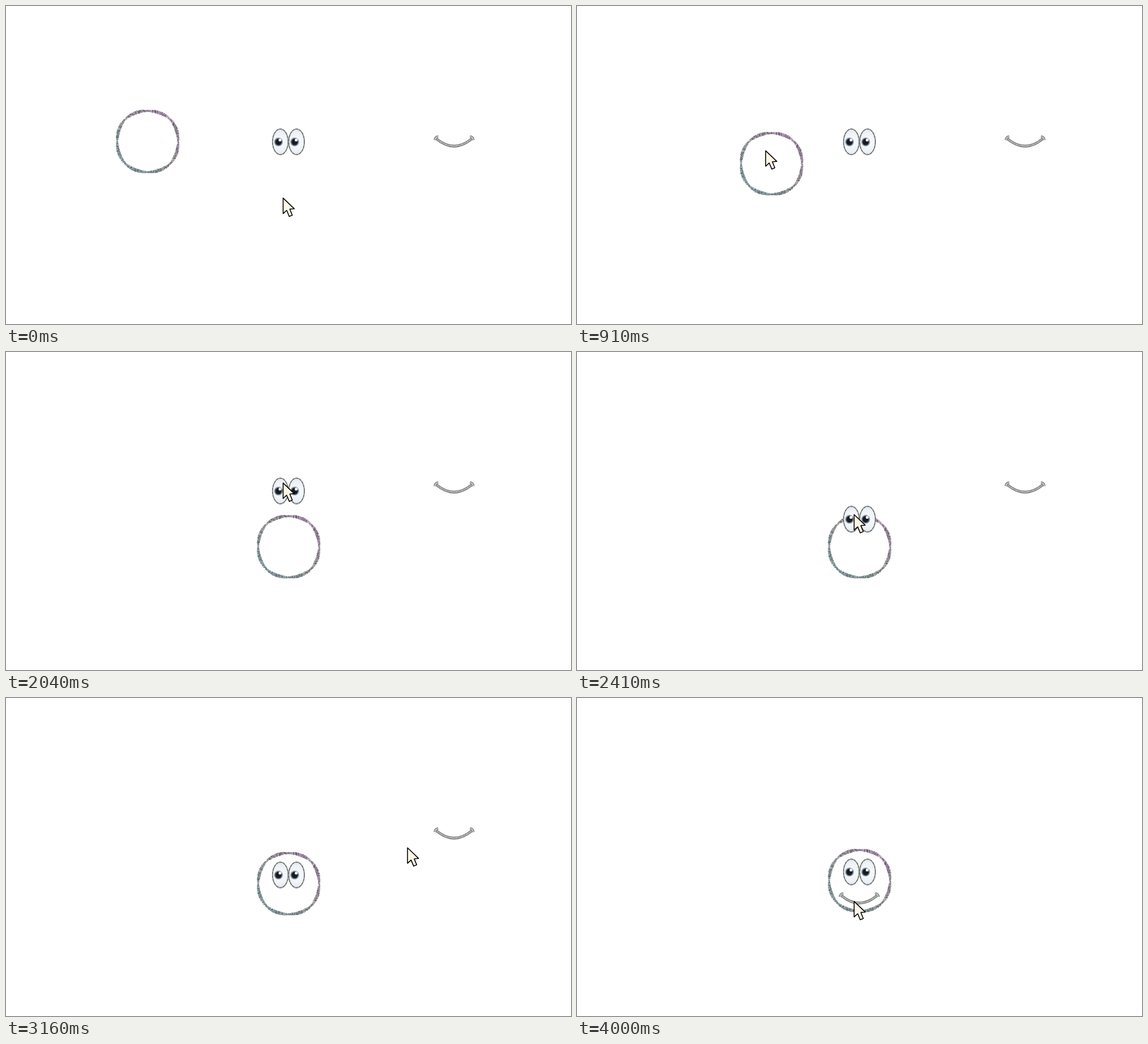
An HTML page with a canvas that plays this animation: 998 px wide and 561 px high, repeating every 4.39 s.

```html
<!DOCTYPE html>
<html>
<head>
<meta charset="utf-8">
<style>
  html, body { margin: 0; width: 100%; height: 100%; overflow: hidden; background: #fff; }
  canvas { display: block; }
</style>
</head>
<body>
<canvas id="stage" width="998" height="561"></canvas>
<script>
const ctx = document.getElementById('stage').getContext('2d');
const LOOP = 4390, LEG = 16, LAST = 96;

// Cursor stops, one leg apart
const stops = [[489, 338], [239, 207.3], [489, 333], [489, 224], [489, 323], [782, 243.5], [489, 358]];

// Progress of a leg, 0 to 1
const leg = (n, i) => Math.min(1, Math.max(0, n / LEG - i));

function at(x, y, draw) {
  ctx.save();
  ctx.translate(x, y);
  draw();
  ctx.restore();
}

function stroke(path, color, width, dash = []) {
  ctx.strokeStyle = color;
  ctx.lineWidth = width;
  ctx.setLineDash(dash);
  ctx.stroke(path);
}

function oval(x, y, rx, ry, fill) {
  const path = new Path2D();
  path.ellipse(x, y, rx, ry, 0, 0, 7);
  ctx.fillStyle = fill;
  ctx.fill(path);
  return path;
}

// Rough, slightly square ring of short hatches, thicker between its eight joints
function ring() {
  let seed = 7;
  const rnd = () => (seed = seed * 16807 % 2147483647) / 2147483647;
  ctx.lineWidth = 0.9;
  for (let i = 0; i < 900; i++) {
    const a = i / 900 * Math.PI * 2;
    const half = 1.2 + 1.5 * Math.abs(Math.sin(4 * a));
    const r = 53.9 + 0.8 * (1 - Math.cos(4 * a)) + (rnd() - 0.5) * 1.2;
    const tint = Math.cos(a + Math.PI / 4);
    const slant = (rnd() - 0.5) * 0.05;
    ctx.strokeStyle = `hsl(${tint > 0 ? 290 : 190}, ${Math.abs(tint) * 13}%, ${26 + rnd() * 54}%)`;
    ctx.beginPath();
    ctx.moveTo((r - half) * Math.cos(a - slant), (r - half) * Math.sin(a - slant));
    ctx.lineTo((r + half) * Math.cos(a + slant), (r + half) * Math.sin(a + slant));
    ctx.stroke();
  }
}

function eye(x) {
  const white = ctx.createRadialGradient(x, 0, 4, x, 0, 24);
  white.addColorStop(0, '#f7f9fc');
  white.addColorStop(0.6, '#eef2f7');
  white.addColorStop(1, '#dde3ea');
  const edge = oval(x, 0, 13.8, 22.6, white);
  stroke(edge, '#a3a8a6', 2);
  stroke(edge, '#6c716e', 1.5, [5, 1.5]);
  oval(x - 3.3, 0.2, 8, 8, '#b4bec9');
  oval(x - 3.3, 0.2, 6.9, 6.9, '#626d78');
  oval(x - 3.3, 0.2, 5.3, 5.5, '#171b21');
  oval(x - 0.7, -3.2, 2.5, 2.5, '#fff');
}

const smile = new Path2D('M-31 -4Q0 21.5 31 -4');
const caps = new Path2D('M-33.8 -2Q-33.5 -7.5 -28 -8M33.8 -2Q33.5 -7.5 28 -8');
function mouth() {
  for (const path of [smile, caps]) stroke(path, '#717471', 4.6);
  for (const path of [smile, caps]) stroke(path, '#c9cbc9', 2.2);
  stroke(smile, '#969996', 1, [8, 2]);
}

const arrow = new Path2D('M.5 .9V28.3L6.8 22.5L11.3 33.2L16.7 31L12.3 20.3L20.2 19.7Z');
function cursor() {
  ctx.lineJoin = 'round';
  ctx.fillStyle = '#fdf5e6';
  ctx.fill(arrow);
  stroke(arrow, '#000', 1.6);
}

function draw(n) {
  ctx.clearRect(0, 0, 998, 561);
  const carry = leg(n, 1), lift = 21.3 * leg(n, 4), smileIn = leg(n, 5);
  at(250.3 + 249 * carry, 239 + 104.5 * carry - lift, ring);
  at(499, 239.6 + 88.5 * leg(n, 3) - lift, () => { eye(-14.4); eye(14.2); });
  at(791.5 - 293 * smileIn, 238.5 + 114.5 * smileIn, mouth);
  const i = Math.min(5, Math.floor(n / LEG)), p = leg(n, i);
  const [x, y] = stops[i].map((v, k) => v + (stops[i + 1][k] - v) * p);
  at(x, y, cursor);
}

// 24 steps a second, each starting on a whole hundredth
let shown = -1;
function tick() {
  const t = Math.floor(performance.now() % LOOP / 10) * 10;
  const n = Math.min(LAST, Math.floor((t + 9.9) * 0.024));
  if (n !== shown) draw(shown = n);
  requestAnimationFrame(tick);
}
tick();
</script>
</body>
</html>
```
